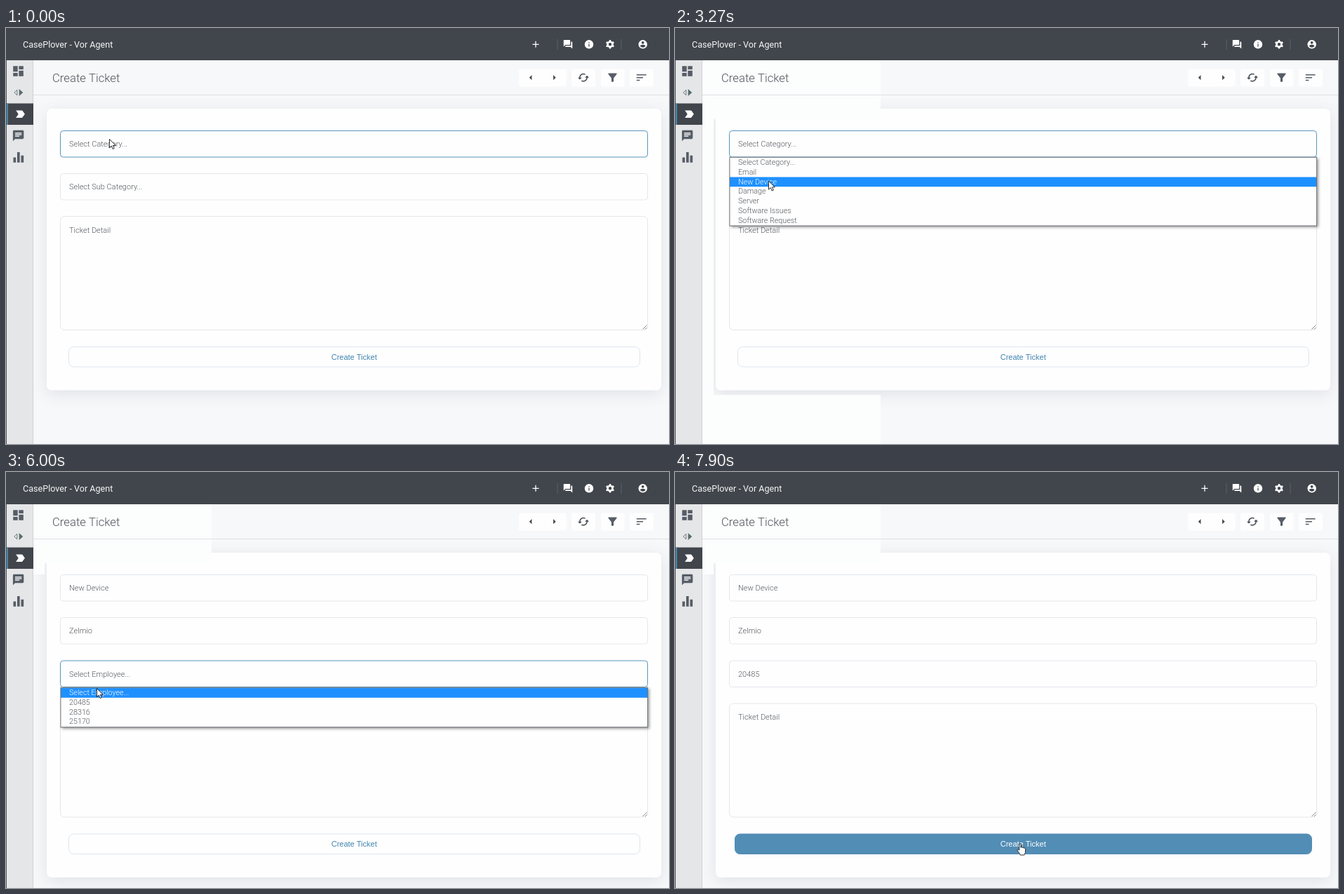
An HTML page with a canvas for the animation above (8 s loop, 945 by 593 pixels).

```html
<!DOCTYPE html>
<html lang="en">
<head>
<meta charset="utf-8">
<title>Create Ticket</title>
<style>
html, body { margin: 0; width: 100%; height: 100%; overflow: hidden; background: #f7f8fa; }
canvas { display: block; width: 945px; height: 593px; }
</style>
</head>
<body>
<canvas id="stage" width="945" height="593"></canvas>
<script>
const g = document.getElementById('stage').getContext('2d');
const LOOP = 8000, ROW = 13.75, GROW = 61.5;
const INK = '#565d66', TEXT = '#54585e', BLUE = '#5795bb', LINE = '#e3e7ec', DARK = '#41464c';

// Pointer stops: time, x, y
const stops = [
  [0, 147, 158], [1390, 163, 158.5], [1510, 174, 159], [1630, 181, 159], [1780, 187, 159],
  [1930, 188, 159], [2460, 188, 160], [2610, 186, 161], [2730, 181, 162], [2850, 176, 163],
  [3000, 148, 187], [3150, 140, 202], [3270, 133, 217.5], [3700, 134, 220], [3820, 134, 222],
  [3970, 135, 223], [4250, 136, 224], [4400, 136, 225], [4550, 136, 239], [4670, 137, 261],
  [4790, 138, 283], [4910, 140, 302], [5030, 141, 315.5], [5180, 141, 317], [5460, 140, 314],
  [5580, 135, 299], [5700, 132, 293], [6000, 129, 308], [6150, 130, 328], [6300, 131, 335],
  [6420, 132, 336], [6570, 132, 331.5], [6720, 132, 331], [7390, 178, 348], [7510, 310, 412],
  [7630, 460, 498], [7780, 483, 524], [7900, 487, 529]
];

const lists = [
  { from: 1930, to: 3580, y: 184, items: ['Select Category...', 'Email', 'New Device', 'Damage', 'Server', 'Software Issues', 'Software Request'] },
  { from: 4250, to: 5460, y: 245.5, items: ['Desktop', 'Laptop', 'Office Phone', 'Other Device', 'Ruvi', 'Zelmio'] },
  { from: 5850, to: 6860, y: 307, items: ['Select Employee...', '20485', '28316', '25170'] }
];

const icons = {
  dash: 'M3 13h8V3H3zM3 21h8v-6H3zM13 21h8V11h-8zM13 3v6h8V3z',
  label: 'M3.5 19h11c.7 0 1.3-.3 1.6-.8L20.5 12l-4.4-6.2c-.3-.5-.9-.8-1.6-.8h-11l4.8 7z',
  chat: 'M20 2H4c-1.1 0-2 .9-2 2v18l4-4h14c1.1 0 2-.9 2-2V4c0-1.1-.9-2-2-2zM6 9h12v2H6zM14 14H6v-2h8zM18 8H6V6h12z',
  bars: 'M10 20h4V4h-4zM4 20h4v-8H4zM16 9v11h4V9z',
  plus: 'M19 13h-6v6h-2v-6H5v-2h6V5h2v6h6z',
  talk: 'M21 6h-2v9H6v2c0 .6.4 1 1 1h11l4 4V7c0-.6-.4-1-1-1zM17 12V3c0-.6-.4-1-1-1H3c-.6 0-1 .4-1 1v14l4-4h10c.6 0 1-.4 1-1z',
  info: 'M12 2a10 10 0 1 0 0 20a10 10 0 1 0 0-20zM13 17h-2v-6h2zM13 9h-2V7h2z',
  user: 'M12 2a10 10 0 1 0 0 20a10 10 0 1 0 0-20zM12 5a3 3 0 1 1 0 6a3 3 0 1 1 0-6zM12 19.2c-2.5 0-4.7-1.3-6-3.2c0-2 4-3.1 6-3.1s6 1.1 6 3.1c-1.3 1.9-3.5 3.2-6 3.2z',
  left: 'M14 7l-5 5 5 5z',
  right: 'M10 17l5-5-5-5z',
  sync: 'M19 8l-4 4h3c0 3.3-2.7 6-6 6-1 0-2-.2-2.8-.7l-1.5 1.5C9 19.5 10.4 20 12 20c4.4 0 8-3.6 8-8h3zM6 12c0-3.3 2.7-6 6-6 1 0 2 .2 2.8.7l1.5-1.5C15 4.5 13.6 4 12 4c-4.4 0-8 3.6-8 8H1l4 4 4-4z',
  funnel: 'M4.2 5.6L10 13v6c0 .6.4 1 1 1h2c.6 0 1-.4 1-1v-6l5.8-7.4c.5-.7 0-1.6-.8-1.6H5c-.8 0-1.3.9-.8 1.6z',
  sort: 'M3 18h6v-2H3zM3 6v2h18V6zM3 13h12v-2H3z'
};
const arrow = new Path2D('M0 0V12.2L2.8 9.6L4.7 14L6.8 13.1L4.9 8.9H8.8z');
const hand = new Path2D('M3.2 9.5V1.6C3.2-.2 5.6-.2 5.6 1.6V6C6-.0 6 5 7.8 6.2C8.2 5.4 9.8 5.6 10 6.8C10.6 6.2 12 6.6 12 8V11.5C12 14 10.6 14.4 10.4 16.5H4.6C4.4 14.6 2 13 .6 10C0 8.6 1.6 8 3.2 9.5z');

function rect(x, y, w, h, color) {
  g.fillStyle = color;
  g.fillRect(x, y, w, h);
}

function box(x, y, w, h, r, fill, stroke) {
  g.beginPath();
  g.roundRect(x, y, w, h, r);
  g.fillStyle = fill;
  g.fill();
  if (stroke) {
    g.strokeStyle = stroke;
    g.lineWidth = 1;
    g.stroke();
  }
}

function shadowed(blur, dx, dy, color, draw) {
  g.save();
  g.shadowBlur = blur;
  g.shadowOffsetX = dx;
  g.shadowOffsetY = dy;
  g.shadowColor = color;
  draw();
  g.restore();
}

function text(s, x, y, font, color, align = 'left') {
  g.font = font;
  g.fillStyle = color;
  g.textAlign = align;
  g.fillText(s, x, y);
}

const label = (s, y, color = TEXT, size = 11) =>
  text(s, 90, y, `300 ${size}px Roboto, sans-serif`, color);

function icon(name, cx, cy, size, color) {
  g.save();
  g.translate(cx - size / 2, cy - size / 2);
  g.scale(size / 24, size / 24);
  g.fillStyle = color;
  g.fill(new Path2D(icons[name]), 'evenodd');
  g.restore();
}

function gear(cx, cy, color) {
  g.beginPath();
  for (let i = 0; i < 24; i++) {
    const a = (i - 0.5) * Math.PI / 12, r = i % 4 < 2 ? 6.3 : 4.7;
    g.lineTo(cx + r * Math.sin(a), cy - r * Math.cos(a));
  }
  g.closePath();
  g.moveTo(cx + 2.2, cy);
  g.arc(cx, cy, 2.2, 0, 7);
  g.fillStyle = color;
  g.fill('evenodd');
}

function topBar() {
  rect(0, 0, 945, 46, DARK);
  text('CasePlover - Vor Agent', 24, 27.5, '400 12.6px Roboto, sans-serif', '#f4f5f5');
  icon('plus', 755, 23.3, 15.5, '#fff');
  icon('talk', 801, 23.3, 15, '#fff');
  icon('info', 831, 23.3, 15, '#fff');
  gear(861, 23.3, '#fff');
  icon('user', 907.7, 23.3, 15, '#fff');
  rect(785.5, 16, 1, 15, '#596067');
  rect(876.5, 16, 1, 15, '#596067');
}

function sideBar() {
  rect(0, 46, 39, 547, '#e5e6e8');
  rect(38, 46, 1, 547, '#cfd2d5');
  rect(0, 46, 1, 547, '#55585c');
  rect(1, 107.5, 38, 30.5, DARK);
  rect(1, 107.5, 2, 30.5, '#4488ae');
  icon('dash', 17.5, 61.5, 19.5, INK);
  g.beginPath();
  g.moveTo(15.8, 88.2); g.lineTo(11.8, 92); g.lineTo(15.8, 95.8); g.closePath();
  g.strokeStyle = '#6d7b7e';
  g.lineWidth = 1;
  g.stroke();
  g.beginPath();
  g.moveTo(18.7, 87); g.lineTo(24.2, 92); g.lineTo(18.7, 97);
  g.fillStyle = '#596b6d';
  g.fill();
  icon('label', 20.5, 122.7, 18, '#fff');
  icon('chat', 17.6, 153.5, 18.5, INK);
  icon('bars', 17.8, 184.4, 22, INK);
}

function header() {
  rect(39, 95, 906, 1, '#dde0e3');
  text('Create Ticket', 66, 76.5, '300 16.7px Roboto, sans-serif', '#50555c');
  for (const [x, w] of [[731, 67.5], [806, 34], [848, 33.5], [889, 34]]) box(x, 58.5, w, 25, 3, '#fefefe');
  icon('left', 748, 70.7, 17.5, '#454b53');
  icon('right', 781.5, 70.7, 17.5, '#454b53');
  icon('sync', 823, 70.7, 17.5, '#454b53');
  icon('funnel', 864.5, 70.7, 18.5, INK);
  icon('sort', 905.7, 70.7, 18.5, INK);
}

function card(t, grow) {
  shadowed(22, 0, 5, 'rgba(60,75,95,.13)', () => box(58, 115, 876, 401.5 + grow, 7, '#fefefe'));
  if (t < 1930) return;
  const pale = '#fcfdfd';
  rect(39, 46, 254, 84, pale);
  if (t < 3820) {
    rect(39, 130, 16, 463, pale);
    rect(39, 523, 254, 70, pale);
  } else {
    rect(39, 130, 16, 16, pale);
  }
}

function field(s, y, focus) {
  box(77.5, y + 0.5, 837, 37.5, 4, '#fefefe', focus ? BLUE : LINE);
  label(s, y + 23);
}

function form(t, grow) {
  field(t < 3580 ? 'Select Category...' : 'New Device', 146, t < 3700);
  field(t < 3700 ? 'Select Sub Category...' : t < 5460 ? 'Desktop' : 'Zelmio', 207, t >= 3820 && t < 5580);
  if (grow) field(t < 6860 ? 'Select Employee...' : '20485', 268.5, t >= 5700 && t < 6990);

  const y = 268.5 + grow;
  box(77.5, y, 837, 162, 6, '#fefefe', LINE);
  label('Ticket Detail', y + 23);
  g.beginPath();
  g.moveTo(907.5, y + 161); g.lineTo(913.5, y + 155);
  g.moveTo(911, y + 161); g.lineTo(913.5, y + 158.5);
  g.strokeStyle = '#777';
  g.lineWidth = 0.9;
  g.stroke();

  const k = t < 7780 ? 0 : t < 7900 ? 0.5 : 1;
  const mix = (a, b) => `rgb(${a.map((v, i) => v + (b[i] - v) * k)})`;
  const by = 454.5 + grow;
  box(89.5 - 4 * k, by, 814 + 8 * k, 28.5, 7,
    mix([254, 254, 254], [82, 141, 181]), mix([222, 230, 239], [82, 141, 181]));
  text('Create Ticket', 496.2, by + 18, '11px "Liberation Sans", Arial, sans-serif',
    mix([65, 133, 174], [255, 255, 255]), 'center');
}

function dropdown(list, py) {
  const { y, items } = list, top = y + 1, h = items.length * ROW + 1.5;
  shadowed(4, 2, 2, 'rgba(0,0,0,.4)', () => rect(77.5, y, 837.5, h, '#fefefe'));
  const pick = Math.max(0, Math.min(items.length - 1, Math.floor((py - top) / ROW)));
  rect(78, top + pick * ROW, 837, ROW, '#1e90ff');
  items.forEach((s, i) => label(s, top + i * ROW + 10.2, i === pick ? '#fff' : TEXT, 10.75));
  g.strokeStyle = '#6c7075';
  g.lineWidth = 1;
  g.strokeRect(77.9, y + 0.3, 836.7, h);
}

function tooltip() {
  box(155, 170, 137.5, 18, 0, '#2b2b2b');
  text('Please select an item in the list.', 160, 182.6, '8.75px "Open Sans", sans-serif', '#fff');
}

function pointer(x, y, shape) {
  g.save();
  g.translate(x + 0.5, y + 0.5);
  g.fillStyle = '#fff';
  g.fill(shape);
  g.strokeStyle = '#15171a';
  g.lineWidth = 0.9;
  g.lineJoin = 'round';
  g.stroke(shape);
  g.restore();
}

function draw(t) {
  const [, px, py] = stops.findLast(s => s[0] <= t);
  const grow = t < 3700 ? 0 : GROW;
  rect(0, 0, 945, 593, '#f7f8fa');
  card(t, grow);
  sideBar();
  topBar();
  header();
  form(t, grow);
  const open = lists.find(l => t >= l.from && t < l.to);
  if (open) dropdown(open, py);
  if (t >= 560 && t < 1930) tooltip();
  pointer(px, py, t < 7780 ? arrow : hand);
}

const start = performance.now();
function tick() {
  draw((performance.now() - start) % LOOP);
  requestAnimationFrame(tick);
}
tick();
</script>
</body>
</html>
```
